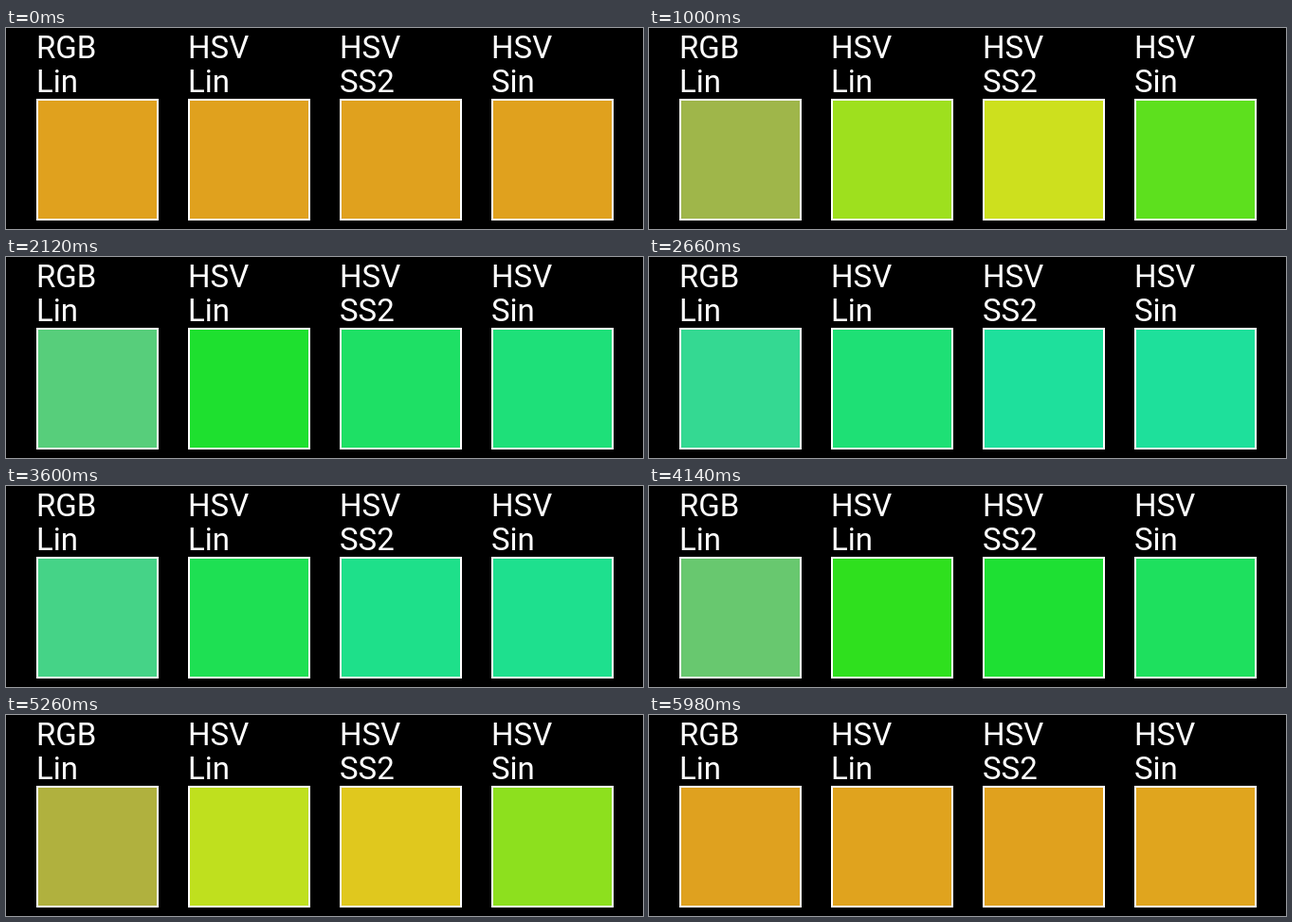
An HTML page for the animation above (6 s loop, 672 by 213 pixels).

```html
<!DOCTYPE html>
<html lang="en">
<head>
<meta charset="utf-8">
<title>Colour easing</title>
<style>
  html, body { margin: 0; width: 100%; height: 100%; overflow: hidden; background: #000; }
  svg { display: block; }
  text { font: 33px Roboto, "Liberation Sans", sans-serif; fill: #fff; }
  rect { stroke: #fff; stroke-width: 2; }
</style>
</head>
<body>
<svg id="stage" width="672" height="213" viewBox="0 0 672 213"></svg>
<script>
const LOOP = 6000;
const rgbFrom = [224, 161, 30], rgbTo = [30, 224, 161];
const hsvFrom = toHsv(rgbFrom), hsvTo = toHsv(rgbTo);

const linear = t => t;
const smootherstep = t => t * t * t * (t * (6 * t - 15) + 10);
const sine = t => Math.sin(t * Math.PI / 2);

const swatches = [
  ["RGB", "Lin", t => mix(rgbFrom, rgbTo, linear(t))],
  ["HSV", "Lin", t => mixHsv(linear(t))],
  ["HSV", "SS2", t => mixHsv(smootherstep(t))],
  ["HSV", "Sin", t => mixHsv(sine(t))]
];

function mix(a, b, t) {
  return a.map((v, i) => v + (b[i] - v) * t);
}

function toHsv([r, g, b]) {
  const max = Math.max(r, g, b), d = max - Math.min(r, g, b);
  const h = max === r ? (g - b) / d : max === g ? 2 + (b - r) / d : 4 + (r - g) / d;
  return [h, d / max, max];
}

function toRgb([h, s, v]) {
  return [5, 3, 1].map(n => {
    const k = (n + h) % 6;
    return v - v * s * Math.max(0, Math.min(k, 4 - k, 1));
  });
}

function mixHsv(t) {
  return toRgb(mix(hsvFrom, hsvTo, t));
}

const stage = document.getElementById("stage");
stage.innerHTML = swatches.map(([space, ease], i) => {
  const x = 32 + 160 * i;
  return `<text x="${x}" y="32">${space}</text>
    <text x="${x}" y="68">${ease}</text>
    <rect x="${x + 1}" y="76" width="127" height="127"/>`;
}).join("");
const boxes = stage.querySelectorAll("rect");

function draw() {
  const phase = performance.now() % LOOP / LOOP;
  const t = 1 - Math.abs(1 - 2 * phase);
  swatches.forEach(([, , color], i) => {
    boxes[i].setAttribute("fill", `rgb(${color(t).map(Math.round)})`);
  });
  requestAnimationFrame(draw);
}
draw();
</script>
</body>
</html>
```
